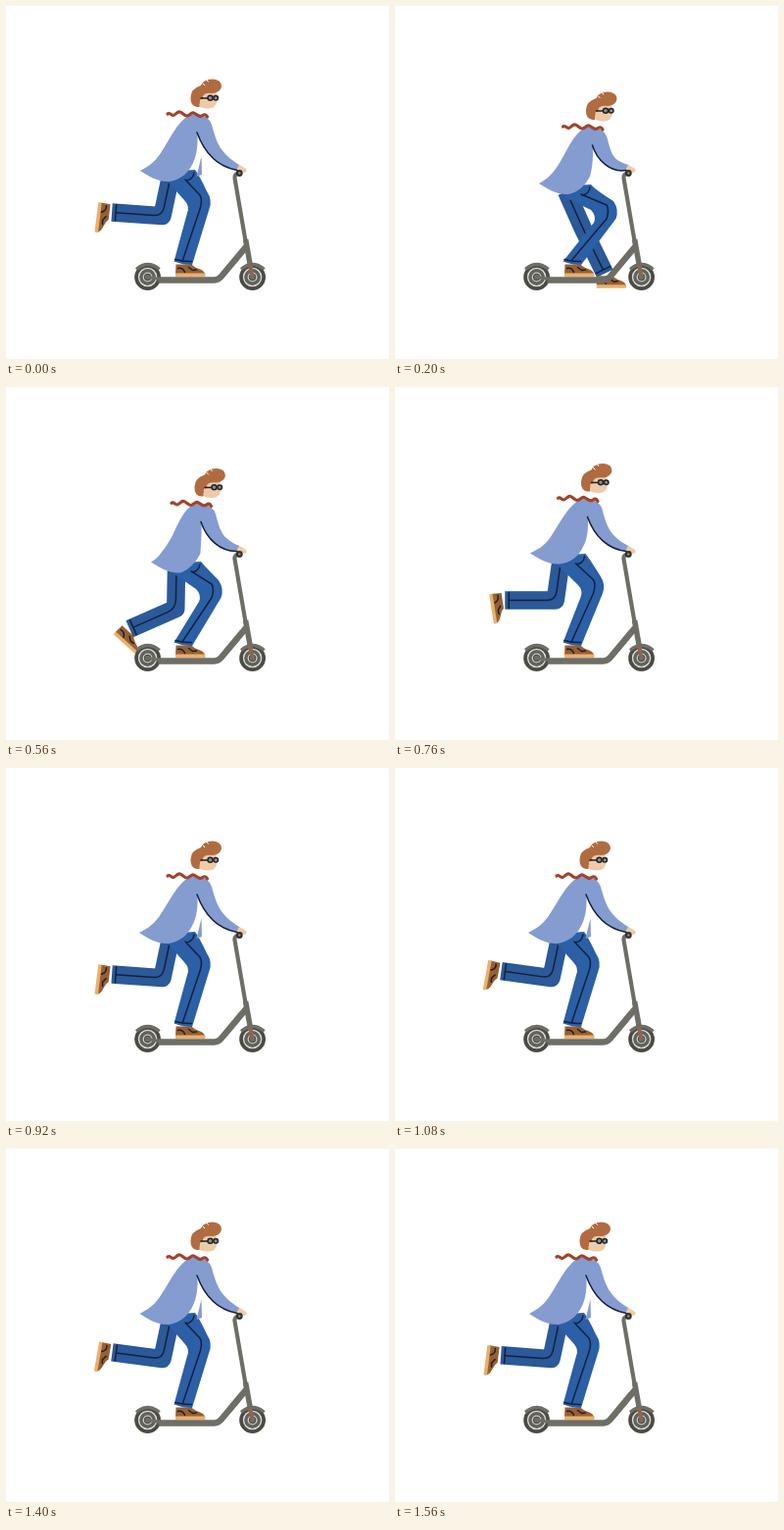
Animation, 391 px wide and 360 px high, one loop 1.6 s. Source, as an HTML page:

```html
<!DOCTYPE html>
<html lang="en">
<head>
<meta charset="utf-8">
<title>Scooter ride</title>
<style>
  html, body { margin: 0; width: 100%; height: 100%; overflow: hidden; background: #fff; }
  svg { display: block; width: 100vw; height: 100vh; }
  path, line { stroke-linejoin: round; }
  .line { fill: none; stroke: #14213a; stroke-width: 1.5; stroke-linecap: round; }
  .metal { fill: none; stroke: #6e6d66; }
  .denim { fill: #2b5fa6; }
  .cloth { fill: #859cd1; }
  .skin { fill: #eecaa8; }
  .hair { fill: #b06c40; }
</style>
</head>
<body>
<svg viewBox="0 0 391 360">
  <defs>
    <g id="shoe">
      <path fill="#99602f" d="M-8 3H8C11 7 17 7 20 10Q22 12 21.500 13H-8.500Z"/>
      <path fill="#e8b06f" d="M-8.500 12H21.500Q23 14 21.500 15.500H-8.500Z"/>
      <path class="line" stroke-width="1" d="M-6 7Q-1 6 1 11M5 6L9 9L13 8.500"/>
    </g>
    <g id="wheel" fill="none">
      <circle r="13.400" fill="#4b4b46"/>
      <circle r="9" stroke="#d9d8d2" stroke-width="1.500"/>
      <circle r="6.600" stroke="#63635d" stroke-width="2.600"/>
      <circle r="4.400" stroke="#cbcac4" stroke-width="1.400"/>
      <circle r="2.800" fill="#6e6d66"/>
      <path class="metal" stroke-width="3.500" d="M-11.500 -8Q0 -18 12 -8"/>
    </g>
  </defs>

  <path id="backLeg" fill="none" stroke="#2b5999" stroke-width="18.500"/>
  <path id="backSeam" class="line"/>
  <g id="backFoot">
    <use href="#shoe"/>
  </g>
  <path id="backHem" class="line"/>

  <g transform="translate(.6 0)">
    <use href="#wheel" x="144" y="276.500"/>
    <use href="#wheel" x="251" y="276.500"/>
    <path class="metal" stroke-width="6.500" d="M155 279.500H212Q216 279.500 219 276L245 245"/>
    <path class="metal" stroke-width="3" d="M144 276.500L157 278.500"/>
    <path class="metal" stroke-width="4.200" d="M238 170Q232 171 233 176L244.500 243"/>
    <path class="metal" stroke-width="5.500" d="M244 238L249 266"/>
    <path fill="none" stroke="#8b6653" stroke-width="4" d="M248.500 264L251 276.500"/>
  </g>

  <use href="#shoe" x="181.500" y="260.500"/>
  <path id="frontLeg" class="denim"/>
  <path id="frontSeam" class="line"/>
  <path class="line" d="M173 258.500Q181 261 189.500 260.500"/>

  <path id="flap" class="cloth" d="M199.500 153L200 172L194.500 174Z"/>
  <path id="jacket" class="cloth"/>
  <path class="skin" d="M232 163Q237 160 240 163L245 166Q247 169 243 170L234 168Z"/>
  <circle cx="238.300" cy="170.500" r="3.400" fill="#30312f"/>
  <circle cx="238.300" cy="170.500" r="1.200" fill="#8d8e88"/>
  <path id="arm" class="cloth"/>
  <path id="armLine" class="line"/>

  <g id="head">
    <path class="skin" d="M195 90L214 86L215.500 97Q214 105 206 104.500Q198 104.500 195 100Z"/>
    <path class="hair" d="M195 103Q188 102 188.500 93Q189 84 199 81Q201 75 211 74.500Q220 75 220 82Q219 88 211 89Q203 88 201 92L200.500 98Q197 96 197.500 103Z"/>
    <path fill="none" stroke="#fff" stroke-width="1" d="M200.500 78.500L203 81M205 75L206.500 77.500"/>
    <circle class="skin" cx="200" cy="97" r="2.200"/>
    <path class="line" stroke-width="1.200" d="M199 94H206"/>
    <g fill="#8b8d92" stroke="#22242b" stroke-width="1.500">
      <circle cx="208.500" cy="93.700" r="2.500"/>
      <circle cx="214.200" cy="93.700" r="2.300"/>
    </g>
    <path fill="none" stroke="#a2432b" stroke-width="3.200" stroke-linecap="round" d="M165 110C167 108 169 112 171 111.500S175 107.500 177.500 108S182 112 184.500 112S189 108.500 191.500 109S196 113 198.500 112.500S203 108.500 205.500 113"/>
  </g>
</svg>
<script>
  const LOOP = 1600;
  const TIMES = [0, 200, 360, 560, 760, 920, 1240, 1600];
  const TRACKS = {
    headX: [0, 6.5, 6, 4, 1.5, 0, 0, 0],
    headY: [0, 13, 12.5, 8.5, 3.5, 0, 0, 0],
    tailX: [0, 10, 11, 11, 1, -1, -1, 0],
    tailY: [0, 13, 13, 10.5, 1.5, 0, 0, 0],
    hipX: [0, 7, 7, 6, 1.5, 0, 0, 0],
    hipY: [0, 15, 14.5, 11, 3, 0, 0, 0],
    kneeX: [0, 18, 16.5, 12, 4.5, 0, 0, 0],
    kneeY: [0, 10, 10, 8, 3.5, 0, 0, 0],
    thigh: [-12, 24, 10, -1, -8, -12, -12, -12],
    shin: [-94, 26, -24, -66, -90, -94, -100, -94],
    foot: [97, 0, 15, 42, 81, 97, 102, 97]
  };

  const $ = id => document.getElementById(id);
  const draw = (id, d) => $(id).setAttribute('d', d);
  const slope = (v, i) => (v[i + 1] - v[i]) / (TIMES[i + 1] - TIMES[i]);

  // Flat at turning points, so poses never overshoot.
  function tangent(v, i) {
    if (i === 0 || i === v.length - 1) return 0;
    const a = slope(v, i - 1), b = slope(v, i);
    return a * b <= 0 ? 0 : 2 * a * b / (a + b);
  }

  function sample(v, t) {
    let i = 0;
    while (i < TIMES.length - 2 && t >= TIMES[i + 1]) i++;
    const span = TIMES[i + 1] - TIMES[i];
    const u = (t - TIMES[i]) / span, w = 1 - u;
    return v[i] * (1 + 2 * u) * w * w + v[i + 1] * (3 - 2 * u) * u * u
      + span * u * w * (tangent(v, i) * w - tangent(v, i + 1) * u);
  }

  const mover = (dx, dy) => (x, y) => `${(x + dx).toFixed(2)} ${(y + dy).toFixed(2)} `;

  function reach([x, y], deg, length) {
    const a = deg * Math.PI / 180;
    return [x + Math.sin(a) * length, y + Math.cos(a) * length];
  }

  function render(t) {
    const p = {};
    for (const key in TRACKS) p[key] = sample(TRACKS[key], t);

    const top = mover(p.headX, p.headY);
    const tail = mover(p.tailX, p.tailY);
    const mid = mover((p.headX + p.tailX) / 2, (p.headY + p.tailY) / 2);
    const elbow = mover(p.headX * 0.5, p.headY * 0.5);
    const hip = mover(p.hipX, p.hipY);
    const knee = mover(p.kneeX, p.kneeY);
    const still = mover(0, 0);

    const root = [168 + p.hipX, 174 + p.hipY];
    const joint = reach(root, p.thigh, 41);
    const ankle = reach(joint, p.shin, 51.5);
    const bend = [reach(joint, p.thigh, -9), reach(joint, p.shin, 9)];
    const hem = reach(ankle, p.shin, -4);
    draw('backLeg', `M${root}L${joint}L${ankle}`);
    draw('backSeam', `M${root}L${bend[0]}Q${joint} ${bend[1]}L${hem}`);
    draw('backHem', `M${reach(hem, p.shin + 90, 8)}L${reach(hem, p.shin - 90, 8)}`);
    $('backFoot').setAttribute('transform', `translate(${ankle}) rotate(${p.foot}) translate(0 -.5)`);

    draw('frontLeg', 'M' + hip(161, 169) + 'L' + hip(193, 167) + 'Q' + hip(197, 172)
      + knee(205, 189) + 'Q' + knee(211, 198) + knee(207.5, 207) + 'L' + still(190, 264)
      + 'Q' + still(181, 264) + still(171.5, 260.5) + 'L' + knee(185, 211)
      + 'Q' + knee(188, 204) + knee(182, 198) + 'L' + hip(166, 180) + 'Z');
    draw('frontSeam', 'M' + hip(183, 177) + 'L' + knee(198, 193) + 'Q' + knee(201, 198)
      + knee(198, 207) + 'L' + still(180.5, 259) + 'M' + hip(184, 178)
      + 'Q' + hip(191, 177) + hip(192, 170));

    draw('jacket', 'M' + top(188, 111) + 'C' + top(174, 118) + mid(166, 139) + mid(156.5, 152)
      + 'C' + mid(151, 160) + tail(143, 165) + tail(137, 168)
      + 'C' + tail(146, 174) + tail(157, 180) + tail(167, 179)
      + 'C' + mid(179, 177) + mid(187, 169) + mid(191, 160)
      + 'C' + top(195, 152) + top(196, 140) + top(195.5, 129)
      + 'L' + top(205, 114) + 'Q' + top(196, 108) + top(188, 111) + 'Z');
    draw('arm', 'M' + top(194, 112) + 'Q' + top(207, 111) + top(210, 121)
      + 'C' + top(215, 140) + elbow(219, 150) + still(238, 162)
      + 'L' + still(235, 167.5) + 'C' + elbow(217, 164) + elbow(203, 151) + top(195, 129) + 'Z');
    draw('armLine', 'M' + top(195, 129) + 'C' + elbow(203, 151) + elbow(217, 164) + still(236, 167.5));
    $('flap').style.display = p.headY < 2 ? '' : 'none';
    $('head').setAttribute('transform', `translate(${p.headX} ${p.headY})`);
  }

  function tick() {
    render(performance.now() % LOOP);
    requestAnimationFrame(tick);
  }
  tick();
</script>
</body>
</html>
```
